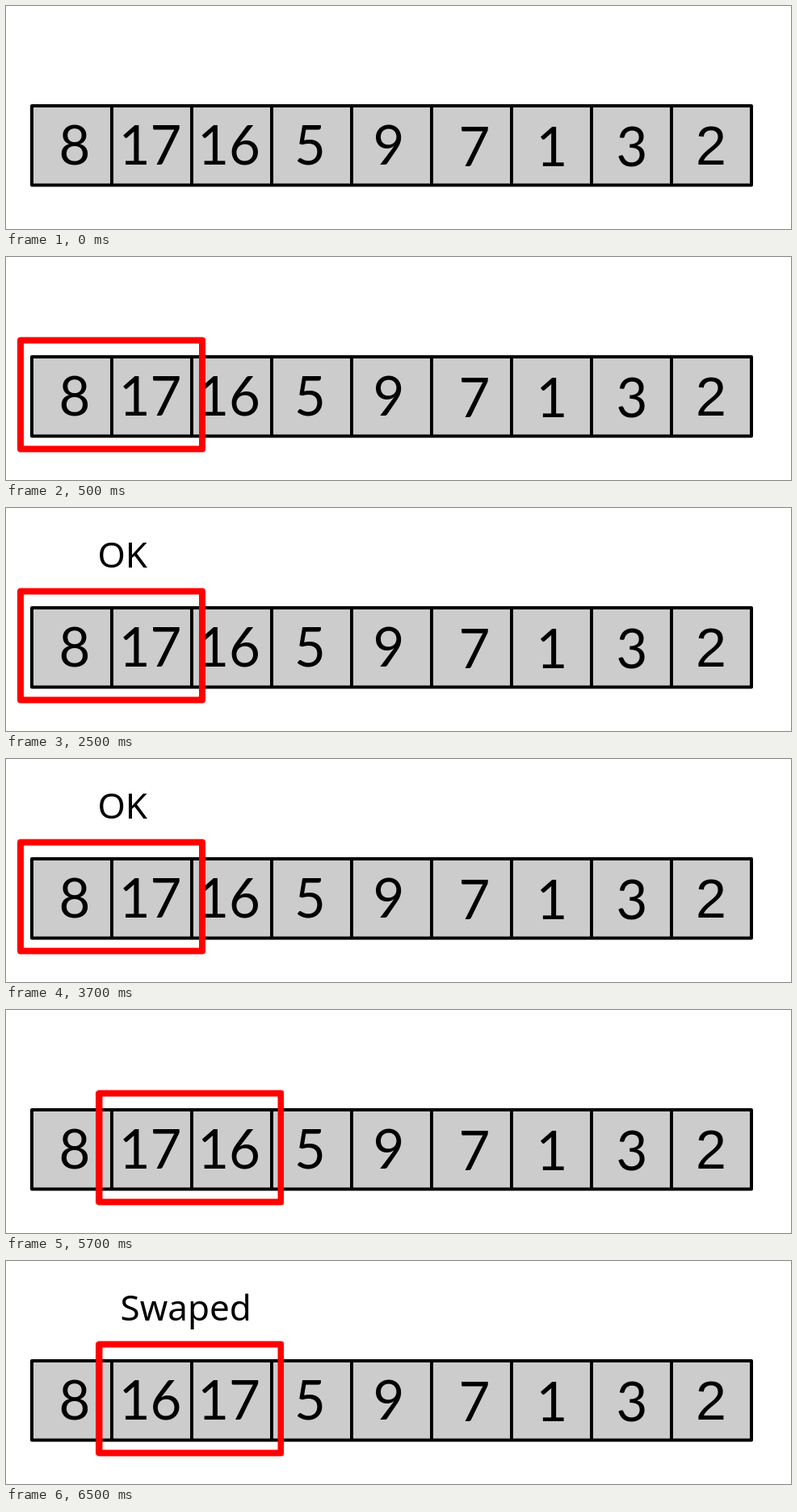
Animation of 972 by 277 pixels, one loop 8000 ms. Source, as an HTML page:

```html
<!DOCTYPE html>
<html lang="en">
<head>
<meta charset="utf-8">
<title>Bubble sort</title>
<style>
  html, body { margin: 0; width: 100%; height: 100%; overflow: hidden; background: #fff; }
  svg { display: block; width: 100%; height: 100%; }
  .num { font: 67px Lato, sans-serif; text-anchor: middle; }
  .plain { font: 68px "Liberation Sans", Arial, sans-serif; }
  .label { font: 44px "Noto Sans", "Open Sans", sans-serif; }
  .cells { fill: #ccc; stroke: #000; stroke-width: 4; stroke-linejoin: round; }
  .frame { fill: none; stroke: #f00; stroke-width: 8; stroke-linejoin: round; }

  .frame, .ok, .before, .after { animation: 8s step-end infinite; }
  .frame { animation-name: frame; }
  .ok { animation-name: ok; }
  .before { animation-name: before; }
  .after { animation-name: after; }

  @keyframes frame {
    0% { visibility: hidden; transform: translateX(0); }
    6.25% { visibility: visible; transform: translateX(0); }
    56.25%, 100% { visibility: visible; transform: translateX(97.5px); }
  }
  @keyframes ok {
    0% { visibility: hidden; }
    31.25% { visibility: visible; }
    56.25%, 100% { visibility: hidden; }
  }
  @keyframes before {
    0% { visibility: visible; }
    81.25%, 100% { visibility: hidden; }
  }
  @keyframes after {
    0% { visibility: hidden; }
    81.25%, 100% { visibility: visible; }
  }
</style>
</head>
<body>
<svg viewBox="0 0 972 277">
  <g class="cells">
    <rect x="32" y="124" width="891" height="98.5"/>
    <path d="M131 124v98m99-98v98m99-98v98m99-98v98m99-98v98m99-98v98m99-98v98m99-98v98"/>
  </g>

  <g class="num">
    <text x="85" y="196.5">8</text>
    <g class="before">
      <text x="178.5" y="196.5">17</text>
      <text x="276" y="196.5">16</text>
    </g>
    <g class="after">
      <text x="178.5" y="196.5">16</text>
      <text x="276" y="196.5">17</text>
    </g>
    <text x="376.5" y="196.5">5</text>
    <text x="474" y="196.5">9</text>
    <text x="580" y="198.5">7</text>
    <text x="676" y="198.5">1</text>
    <text x="775" y="198.5">3</text>
    <text class="plain" x="873" y="197">2</text>
  </g>

  <g class="label">
    <text class="ok" x="113.5" y="74">OK</text>
    <text class="after" x="141.5" y="74">Swaped</text>
  </g>
  <rect class="frame" x="18" y="103.5" width="225" height="135"/>
</svg>
</body>
</html>
```
